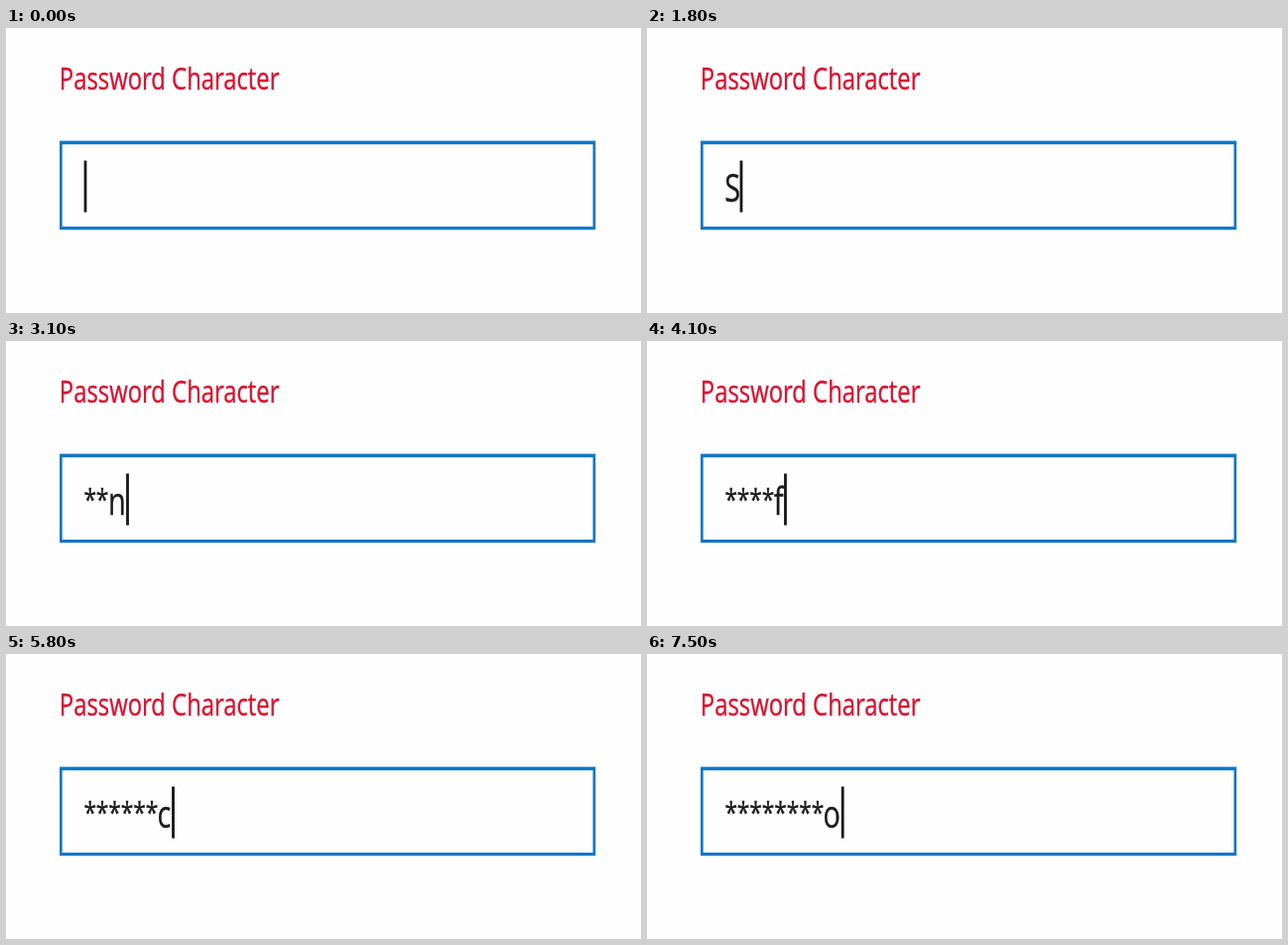
Write an HTML page that moves like this. It is 640 px wide and 287 px high and loops after 8 s.

```html
<!DOCTYPE html>
<html lang="en">
<head>
<meta charset="utf-8">
<title>Password field</title>
<style>
  html, body { margin: 0; width: 100%; height: 100%; overflow: hidden; background: #fefefe; }
  svg { display: block; width: 100vw; height: 100vh; }
  text { font-family: "Open Sans", "Noto Sans", sans-serif; fill: #1c1c1c; stroke: #1c1c1c; stroke-width: .4px; }
  .label { font-size: 31px; fill: #d9102f; stroke: #d9102f; }
  .stars { font-size: 30px; letter-spacing: -0.2px; }
  .key { font-size: 38px; }
</style>
</head>
<body>
<svg viewBox="0 0 640 287">
  <text class="label" transform="translate(53.8 61.5) scale(.769 1)">Password Character</text>
  <rect x="54" y="113.6" width="540.2" height="89.6" fill="#1077c4"/>
  <rect x="56.7" y="117.2" width="534.8" height="82.8" fill="#fefefe"/>
  <text class="stars" id="stars" transform="translate(78.4 169.8) scale(.763 1)"></text>
  <text class="key" id="key"></text>
  <rect id="caret" y="133.5" width="2.8" height="52" fill="#161616"/>
</svg>
<script>
  const LOOP = 8000, LEFT = 78.2, STEP = 12.4;

  // start time, hidden characters, visible key, caret centre (0 = off)
  const steps = [
    [0, 0, "", 80],
    [500, 0, "", 0],
    [1100, 0, "", 80],
    [1800, 0, "S", 95],
    [2600, 1, "g", 110.5],
    [3000, 2, "", 105.5],
    [3100, 2, "n", 122.5],
    [3600, 3, "e", 131.5],
    [4100, 4, "f", 139.5],
    [4900, 5, "u", 158.7],
    [5800, 6, "c", 168.5],
    [6800, 7, "", 167.5],
    [6900, 7, "l", 173.5],
    [7500, 8, "o", 197.2]
  ];

  const [stars, key, caret] = ["stars", "key", "caret"].map(id => document.getElementById(id));
  const begin = performance.now();
  let shown;

  function show([, count, letter, x]) {
    stars.textContent = "*".repeat(count);
    key.textContent = letter;
    key.setAttribute("transform", `translate(${LEFT + count * STEP} 175.2) scale(.76 1)`);
    caret.setAttribute("x", x - 1.4);
    caret.style.visibility = x ? "visible" : "hidden";
  }

  function tick() {
    const t = Math.max(0, performance.now() - begin) % LOOP;
    const step = steps.findLast(s => s[0] <= t);
    if (step !== shown) show(shown = step);
    requestAnimationFrame(tick);
  }
  tick();
</script>
</body>
</html>
```
